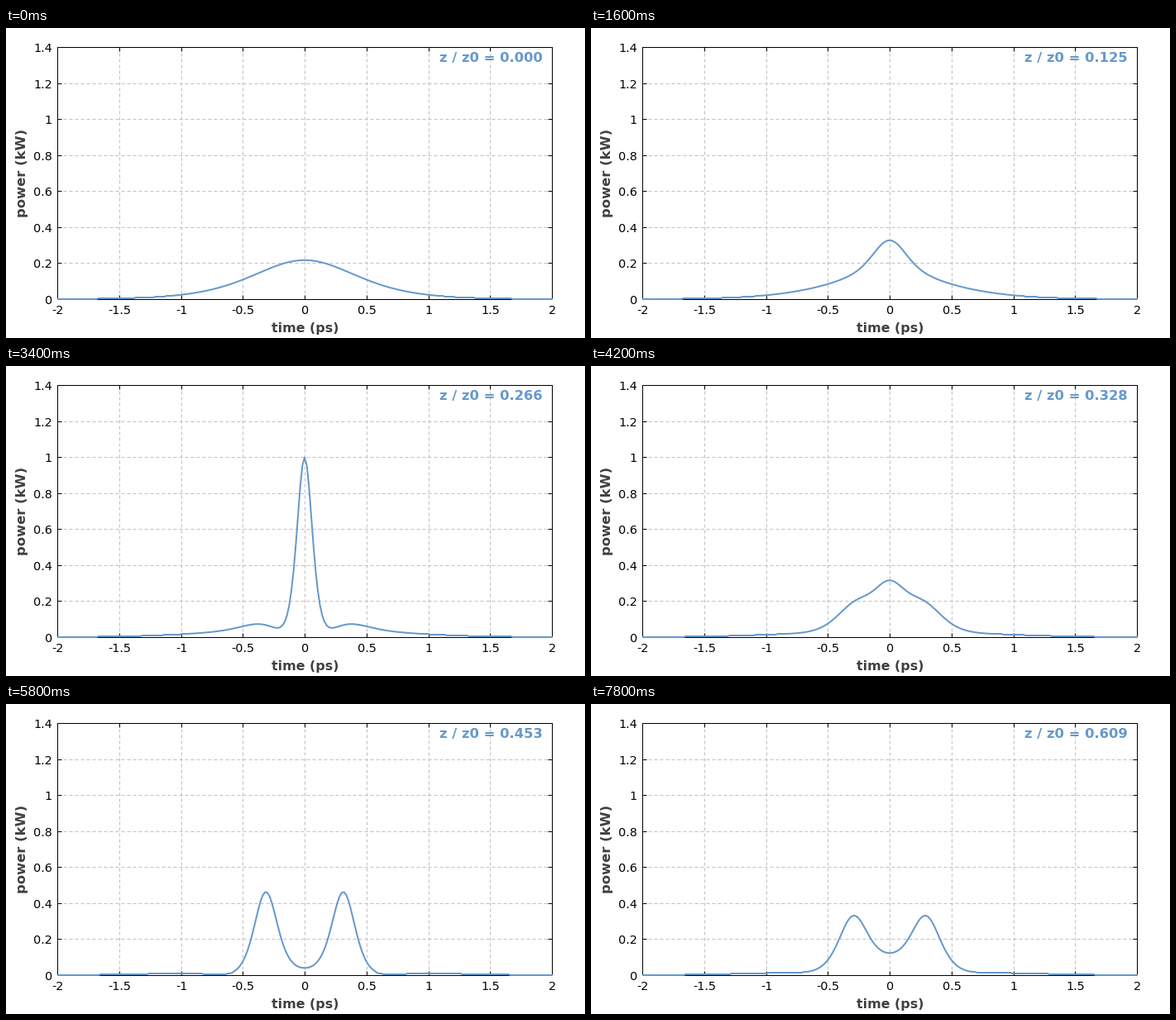
Write a matplotlib script that moves like this. It is 700 by 375 pixels and loops after 8000 ms.

```python
import numpy as np
import matplotlib.pyplot as plt
from matplotlib.animation import FuncAnimation
from matplotlib.patches import Rectangle

W, H, DPI = 700, 375, 100
LEFT, RIGHT, TOP, BOTTOM = 62, 660, 23, 328
T_MAX, P_MAX = 2, 1.4
FRAMES, INTERVAL = 40, 200
STEPS_PER_PERIOD = 64

ORDER = 3                # soliton order
PEAK = 0.2165            # launch power, kW
T0 = 1 / 1.7627          # sech width for a 1 ps FWHM pulse
Z_SCALE = 1.003

BLUE, GREY, DARK = "#6699cc", "#c0c0c0", "#404040"
plt.rcParams["font.family"] = "DejaVu Sans"


def pt(px):
    return px * 72 / DPI


def px_x(t):
    return LEFT + (t + T_MAX) * (RIGHT - LEFT) / (2 * T_MAX)


def px_h(p):
    return p * (BOTTOM - TOP) / P_MAX


def propagate(n=1024, half=16.0, substeps=200):
    """Split-step solution of the nonlinear Schroedinger equation."""
    x = (np.arange(n) - n // 2) * 2 * half / n
    k = 2 * np.pi * np.fft.fftfreq(n, 2 * half / n)
    dz = np.pi / 2 * Z_SCALE / STEPS_PER_PERIOD / substeps
    linear = np.exp(-0.5j * k**2 * dz)
    u = ORDER / np.cosh(x) + 0j
    powers = []
    for _ in range(FRAMES):
        powers.append(PEAK * np.abs(u) ** 2 / ORDER**2)
        for _ in range(substeps):
            u = u * np.exp(0.5j * dz * np.abs(u) ** 2)
            u = np.fft.ifft(linear * np.fft.fft(u))
            u = u * np.exp(0.5j * dz * np.abs(u) ** 2)
    t = x * T0
    keep = np.abs(t) < T_MAX + 0.05
    return t[keep], np.array(powers)[:, keep]


fig = plt.figure(figsize=(W / DPI, H / DPI), dpi=DPI, facecolor="white")
ax = fig.add_axes([0, 0, 1, 1])
ax.set_xlim(0, W)
ax.set_ylim(H, 0)
ax.axis("off")


def line(xs, ys, color="black", z=2, **kw):
    # coordinates are pixel centres already, so snapping would move them
    ax.plot(xs, ys, color=color, lw=pt(1), zorder=z, snap=False,
            solid_capstyle="butt", **kw)


def label(x, y, s, size, **kw):
    return ax.text(x, y, s, fontsize=pt(size), va="baseline", **kw)


DASH = dict(color=GREY, z=1, linestyle=(0, (4, 3)))
TICK = 5
X0, X1, Y0, Y1 = LEFT + 0.5, RIGHT + 0.5, TOP + 0.5, BOTTOM + 0.5

for i in range(9):
    t = -T_MAX + 0.5 * i
    x = np.floor(px_x(t) + 0.5) + 0.5
    if 0 < i < 8:
        line([x, x], [Y1, Y0], **DASH)
    line([x, x], [Y1, Y1 - TICK])
    line([x, x], [Y0, Y0 + TICK])
    label(x, 346, f"{t:g}", 14.4, ha="center")

for i in range(8):
    p = 0.2 * i
    y = np.floor(BOTTOM - px_h(p) + 0.5) + 0.5
    if 0 < i < 7:
        line([X0, X1], [y, y], **DASH)
    line([X0, X0 + TICK], [y, y])
    line([X1, X1 - TICK], [y, y])
    label(56, y + 5.5, f"{p:g}", 14.4, ha="right")

ax.add_patch(Rectangle((X0, Y0), X1 - X0, Y1 - Y0, fill=False,
                       ec="black", lw=pt(1), zorder=2, snap=False))

label(361.5, 368, "time (ps)", 15.9, ha="center", color=DARK, weight="bold")
label(24, 175.5, "power (kW)", 16.4, ha="center", color=DARK, weight="bold",
      rotation=90, rotation_mode="anchor")
readout = label(649, 41, "", 16.4, ha="right", color=BLUE, weight="bold")

time, powers = propagate()
curve, = ax.plot([], [], color=BLUE, lw=pt(2), zorder=3, snap=False)
window = Rectangle((LEFT, TOP), RIGHT - LEFT + 1, BOTTOM - TOP + 1,
                   transform=ax.transData)
curve.set_clip_path(window)


def draw(i):
    h = px_h(powers[i])
    h = np.where(h < 4, np.round(h), h)   # flat tails sit on whole pixels
    curve.set_data(px_x(time), BOTTOM - h)
    readout.set_text(f"z / z0 = {int(i / STEPS_PER_PERIOD * 1000 + 0.5) / 1000:.3f}")
    return curve, readout


anim = FuncAnimation(fig, draw, frames=FRAMES, interval=INTERVAL,
                     repeat=True, repeat_delay=0, blit=False)
plt.show()
```
